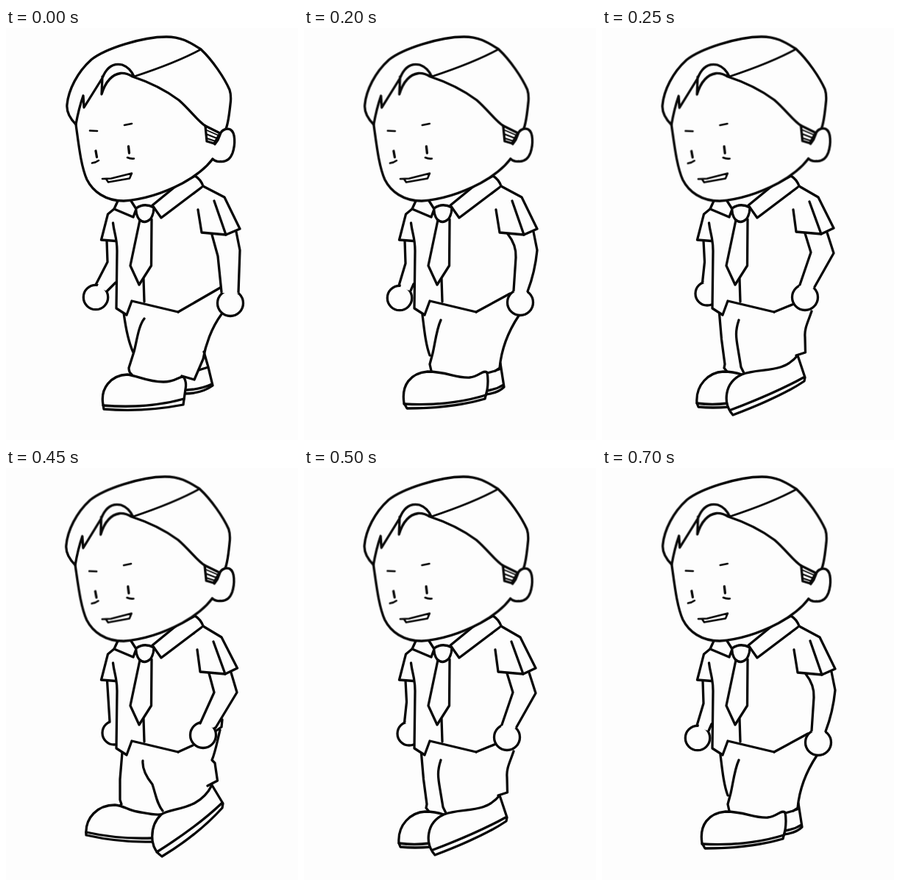
An HTML page that plays this animation: 397 by 560 pixels, repeating every 0.75 s.

```html
<!DOCTYPE html>
<html lang="en">
<head>
<meta charset="utf-8">
<title>Walking boy</title>
<style>
  html, body { margin: 0; width: 100%; height: 100%; overflow: hidden; background: #fdfdfd; }
  svg { display: block; width: 100vw; height: 100vh; }
  path, circle { fill: none; stroke: #080808; stroke-width: 3.3; stroke-linecap: round; stroke-linejoin: round; }
  .fill { fill: #fdfdfd; }
  .mask { fill: #fdfdfd; stroke: none; }
  .thin { stroke-width: 2.6; }
  .hatch { stroke-width: 1.9; }

  .a, .b, .c, .d, .head { animation: 750ms step-end infinite; }
  .a { animation-name: far-back; }
  .b { animation-name: back; }
  .c { animation-name: mid; }
  .d { animation-name: fore; }
  .head { animation-name: nod; transform-origin: 190px 235px; }

  @keyframes far-back { 0% { visibility: visible } 16%, 100% { visibility: hidden } }
  @keyframes back { 0% { visibility: hidden } 16% { visibility: visible } 33.333% { visibility: hidden } 82.667%, 100% { visibility: visible } }
  @keyframes mid { 0% { visibility: hidden } 33.333% { visibility: visible } 49.333% { visibility: hidden } 66.667% { visibility: visible } 82.667%, 100% { visibility: hidden } }
  @keyframes fore { 0% { visibility: hidden } 49.333% { visibility: visible } 66.667%, 100% { visibility: hidden } }
  @keyframes nod {
    0% { transform: rotate(0deg) }
    16%, 82.667% { transform: rotate(-.14deg) }
    33.333%, 66.667% { transform: rotate(-.32deg) }
    49.333% { transform: rotate(-.5deg) }
    100% { transform: rotate(-.14deg) }
  }
</style>
</head>
<body>
<svg viewBox="0 0 397 560" preserveAspectRatio="none">
  <!-- far arm, legs and shoes -->
  <g class="a">
    <circle class="fill" cx="122" cy="366" r="16.7"/>
    <path class="mask" d="M124 352L138 358L147 345L137 324Z"/>
    <path d="M137 289L138 318L122 349M149 346L137 358"/>
    <path d="M160 387C163 410 167 428 173 441M188 395C180 405 178 425 174 440L167 462Q167 468 171 471M293 389C279 408 271 432 268 450L256 478L239 473"/>
    <path d="M269 440L275 461L281 486C270 494 256 497 243 497M262 465L275 461M246 492Q265 491 280 484"/>
    <path class="fill" d="M132 512C128 490 142 472 165 471C180 473 192 481 214 481C230 481 234 474 241 474Q246 480 244 491L241 512C210 518 170 521 133 518Z"/>
    <path d="M132 513C170 516 210 513 242 504"/>
  </g>
  <g class="b">
    <circle class="fill" cx="130" cy="367" r="16.7"/>
    <path class="mask" d="M131 353L144 357L148 346L138 326Z"/>
    <path d="M137 289L138 320L129 350M149 348L145 357"/>
    <path d="M161 390C164 415 166 432 171 445M186 397C180 410 178 430 175 442L171 457L173 466M292 391C276 415 268 440 266 462L260 466"/>
    <path d="M267 456L272 488C266 494 257 497 247 498M249 493Q262 491 271 485M262 465L268 463"/>
    <path class="fill" d="M136 510C132 485 145 469 168 467C195 467 205 476 225 475C238 474 243 464 249 468Q251 480 249 492L246 504C215 513 180 517 140 517Z"/>
    <path d="M136 511C175 513 215 509 247 499M249 469L260 466"/>
  </g>
  <g class="c">
    <circle class="fill" cx="143" cy="361" r="16"/>
    <path class="mask" d="M138 347L149 352L149 330L141 325Z"/>
    <path d="M138 289L139.500 318L136.500 346"/>
    <path d="M159.500 388L162.500 423L167 457L166 462L170 467M186 397C181 412 182 420 185 437L189 461L193 469M285 385C280 400 275 408 276 420L276.500 441L264 445"/>
    <path class="fill" d="M129 510C127 485 145 468 165 467Q178 467 190 471L173 515Q150 517 131 515Z"/>
    <path d="M129 510Q150 513 171 510"/>
    <path class="fill" d="M178 526C164 510 166 482 190 471C215 461 245 471 266 445L276 475L275 480C250 497 215 512 178 526Z"/>
    <path d="M174 519.500C210 506 245 491 274 475"/>
  </g>
  <g class="d">
    <circle class="fill" cx="147" cy="360" r="16"/>
    <path class="mask" d="M142 347L150 350L149 330L141 330Z"/>
    <path d="M137.500 289L141 345"/>
    <path d="M158 387L155 423L155 451L157 457L153 461M186 398C185 410 191 420 199 430C204 445 205 456 213 466M291 356C287 372 285 385 280 397L284 401L287.500 425L274 432"/>
    <path class="fill" d="M109 499C107 475 125 458 148 458C160 459 166 465 178 467S200 472 210 471L201 508C170 509 140 506 109 499Z"/>
    <path d="M109 495C140 502 170 504 199 503"/>
    <path class="fill" d="M212 528C194 516 195 486 211 471C224 461 262 467 280 431L295 456L294 462C275 483 245 508 212 528Z"/>
    <path d="M205 522C240 500 270 478 294 455"/>
  </g>

  <!-- shirt and tie -->
  <path class="mask" d="M147 246L138 254L130 288L149 289L150 380L164 390L171 371L234 386L260 374L280 340L299 281L295 230L268 215L200 225Z"/>
  <path d="M147 246L138.500 253L129.500 288L149 289.500M145.500 265C147 279 151 285 151 303L150 381L164 390L171 371L234 386"/>
  <path d="M187 341L188 372"/>
  <path class="fill" d="M182 261L169 323L181 349L197.500 323L198 260"/>
  <path class="fill" d="M152 235L147 246L173 257L177 246L170 235"/>
  <path class="fill" d="M199 241L211 258L268 215Q265 206 257 201L232 214Z"/>
  <path class="fill" d="M177 245Q188 237 201 244Q201 254 196 260Q188 267 181 260Q176 253 177 245Z"/>

  <!-- near arm and sleeve -->
  <g class="a">
    <path d="M234 386L293 352"/>
    <circle class="fill" cx="305" cy="374" r="17.5"/>
    <path class="mask" d="M280 281L288 310L293 360L316 361L318 302L313 277Z"/>
    <path d="M280 281L288 310L293 359M313 277L318 302L316 359"/>
    <path class="fill" d="M261 247L266 278L299 281L318 273L297 230L268 215"/>
    <path d="M283 235L299 281"/>
  </g>
  <g class="b">
    <path d="M234 386L280 361"/>
    <circle class="fill" cx="294" cy="373" r="17.5"/>
    <path class="mask" d="M277 280L288 308L285 359L303 360L317 302L312 277Z"/>
    <path d="M277 280Q289 295 288 312L285 357M312 277L317 302Q314 332 304 358"/>
    <path class="fill" d="M261 247L266 278L299 281L317 273L296 230L268 215"/>
    <path d="M283 235L299 281"/>
  </g>
  <g class="c">
    <path d="M234 386L261 375"/>
    <circle class="fill" cx="276" cy="366" r="17.5"/>
    <path class="mask" d="M276 279L284 305L268 352L287 354L315 306L306 278Z"/>
    <path d="M276 279L284 305L269 349M306 278L315 306L289 352"/>
    <path class="fill" d="M260 247L264 277L298 280L315 272L294 230L268 215"/>
    <path d="M282 236L298 280"/>
  </g>
  <g class="d">
    <path d="M234 386L254 377"/>
    <circle class="fill" cx="268" cy="363" r="17.5"/>
    <path class="mask" d="M276 279L283 305L263 349L282 353L314 305L306 278Z"/>
    <path d="M276 279L283 305L264 347M306 278L314 305L285 353M294 342L293 352L286 357"/>
    <path class="fill" d="M260 247L264 277L298 280L314.500 272L293 230L268 215"/>
    <path d="M282 236L298 280"/>
  </g>

  <!-- head -->
  <g class="head">
    <path class="fill" d="M281 178C272 190 258 201 240 211C215 224 190 233 160 235C135 235 118 222 110 206C102 188 99 160 95 131C86 122 82 114 83 104C85 84 97 60 116 43C135 28 185 12 218 12C240 12 252 21 265 29C281 44 297 68 304 84Q306 90 305.500 99C304 114 302 130 299 137"/>
    <path d="M95 131Q99 109 105 92L106 108L131 68C138 50 149 48 158 50Q169 54 174 66M131 66L130 90Q138 64 156 61.500Q164 61 172 66C190 72 215 83 235 98C250 111 262 128 271 133"/>
    <path class="thin" d="M174 66Q232 47 265 29"/>
    <path class="fill" d="M271 133L273 154L283 157L291 143Z"/>
    <path class="hatch" d="M273 139L289 146M273 144.500L287 150M273 150L285 154"/>
    <path class="fill" d="M281 178C284 181 288 182 292 181.500C299 182 305 178 308 170C312 158 312 142 305 138C300 136 293 138 291 145Q289 152 284 158"/>
    <path d="M122 167L123.500 175.500M166.500 161L167.500 170"/>
    <path class="thin" d="M114 139.500L124 140M161 132L171 130M117 183.500Q122 183 126 180M165 176Q169 178 174 177.500"/>
    <path class="thin" d="M131 205L143 204.500L171 197.500L168 204.500L139 209.500L136 205"/>
  </g>
</svg>
</body>
</html>
```
